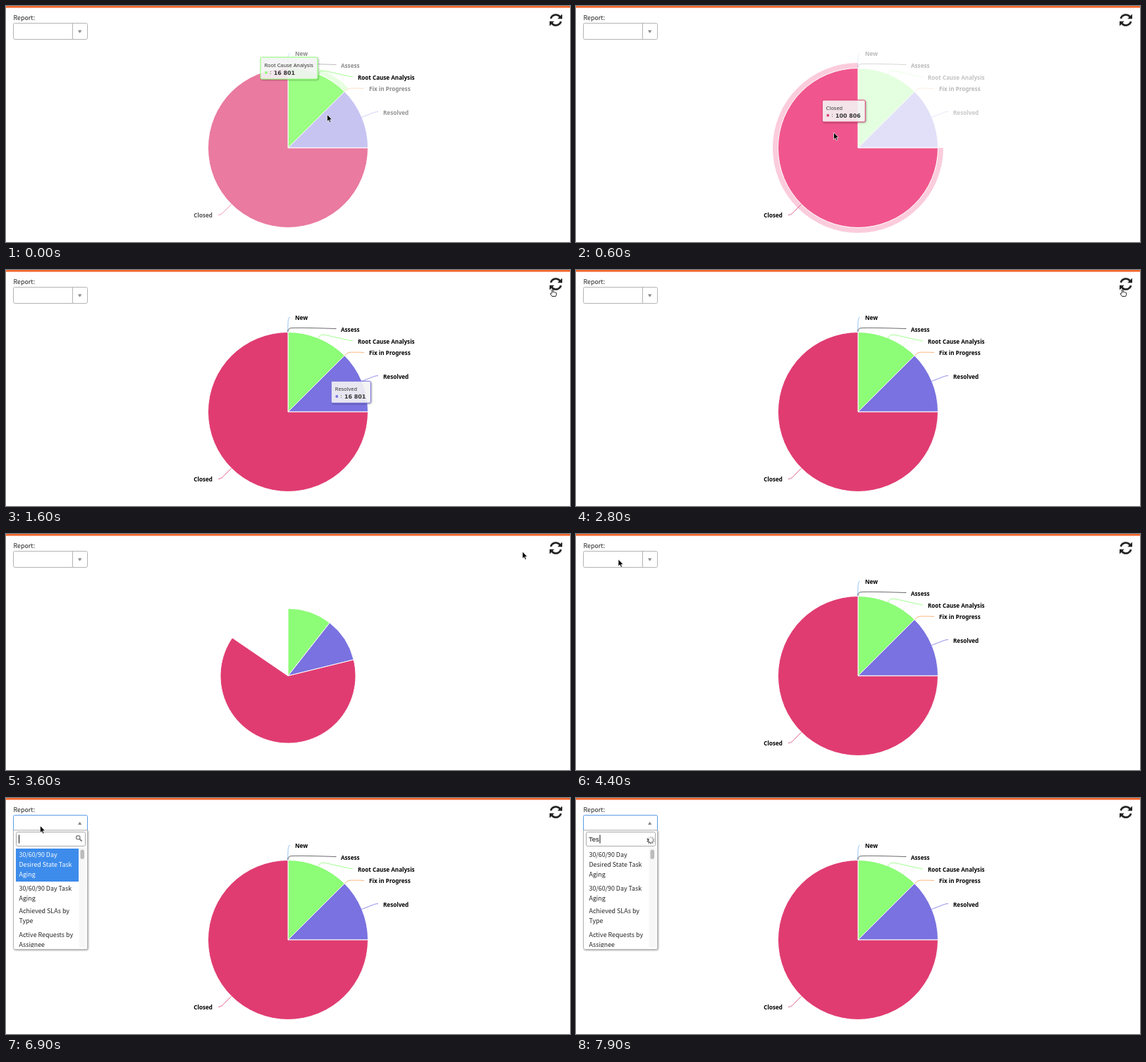
Write an HTML page that moves like this. It is 800 by 336 pixels and loops after 8000 ms.

```html
<!DOCTYPE html>
<html lang="en">
<head>
<meta charset="utf-8">
<title>Report pie chart</title>
<style>
html, body { margin: 0; width: 100%; height: 100%; overflow: hidden; background: #fff; }
svg { display: block; }
text { white-space: pre; }
.ui { font: 8.85px "Noto Sans CJK JP", "Noto Sans CJK SC", "Noto Sans CJK", sans-serif; fill: #222; }
.label { font: bold 8.1px "Noto Sans", sans-serif; }
.head { font: 7.4px "Noto Sans", sans-serif; fill: #333; }
.value { font: bold 7.9px "DejaVu Sans", sans-serif; fill: #333; }
.typed { font: 9.5px "Liberation Sans", sans-serif; fill: #111; }
</style>
</head>
<body>
<svg width="800" height="336" viewBox="0 0 800 336">
  <defs>
    <filter id="shadow" x="-20%" y="-20%" width="150%" height="150%">
      <feDropShadow dx="1" dy="1" stdDeviation="1" flood-opacity=".35"/>
    </filter>
    <clipPath id="listClip"><rect x="11" y="70" width="104" height="142.5"/></clipPath>
    <path id="arrowHalf" d="M772.8 17.8A7.5 7.5 0 0 1 786 15.6" fill="none" stroke="#222" stroke-width="2.7"/>
    <path id="arrowTip" d="M789 11.5V18.3H782.3Z" fill="#222"/>
  </defs>
  <rect width="800" height="2.6" fill="#f4662b"/>
  <text class="ui" x="10.5" y="20">Report:</text>

  <g id="refresh">
    <use href="#arrowHalf"/><use href="#arrowTip"/>
    <g transform="rotate(180 780 20)"><use href="#arrowHalf"/><use href="#arrowTip"/></g>
  </g>

  <g id="chart"></g>

  <g id="tip">
    <rect id="tipBox" height="31" rx="2" fill="#f8f8f8" fill-opacity=".86" filter="url(#shadow)"/>
    <text id="tipHead" class="head" x="5.5" y="14"></text>
    <circle id="tipDot" cx="8" cy="21.7" r="1.9"/>
    <text class="head" x="13.3" y="24.2">:</text>
    <text id="tipValue" class="value" x="18.8" y="24.5"></text>
  </g>

  <g id="closedBox" fill="none" stroke="#b4b4b4">
    <rect id="field" x="10.5" y="24.5" width="105" height="23" rx="2"/>
    <path d="M94.5 25V47"/>
    <path d="M102 34.5H107.4L104.7 38.8Z" fill="#888" stroke="none"/>
  </g>

  <g id="openBox">
    <path d="M10.5 46V26.5Q10.5 24.5 12.5 24.5H113.5Q115.5 24.5 115.5 26.5V46" fill="#fff" stroke="#5c9de6"/>
    <path d="M102 38H107.4L104.7 33.8Z" fill="#888"/>
    <path d="M10.5 46V213.5Q10.5 215.5 12.5 215.5H113.5Q115.5 215.5 115.5 213.5V46Z" fill="#fff" stroke="#b4b4b4" filter="url(#shadow)"/>
    <path d="M11 45.5H115" stroke="#ccc"/>
    <rect x="14.5" y="48.5" width="98" height="20" rx="2" fill="#fff" stroke="#aaa"/>
    <g id="lens" fill="none" stroke="#777">
      <circle cx="102.3" cy="56.3" r="2.7" stroke-width="1.2"/>
      <path d="M104.4 58.4L107.6 61.6" stroke-width="1.8"/>
    </g>
    <g id="spinner"></g>
    <text id="typed" class="typed" x="18" y="62"></text>
    <path id="caret" stroke="#111"/>
    <rect id="pick" x="14" y="72" width="89" height="47" fill="#3d8ceb"/>
    <g id="list" clip-path="url(#listClip)"></g>
    <rect x="103.5" y="71" width="10" height="142" fill="#f7f7f7"/>
    <rect x="105.5" y="73.5" width="5.5" height="13.5" rx="2.7" fill="#bcbcbc"/>
  </g>

  <path id="arrow" d="M0 0V10L2.3 7.9L3.9 11.5L5.5 10.8L4 7.3H7Z" fill="#000" stroke="#fff" stroke-width=".7"/>
  <path id="hand" d="M-.9 5.5V.5Q0-.8.9.5V4Q1.8 3.2 2.5 4.2Q3.4 3.5 4 4.6Q5.4 4.2 5.4 5.6V7.6L4.4 10H-.8L-3.2 6.4Q-3 5-1.8 5.8Z"
    fill="#fff" stroke="#111" stroke-width=".9"/>
</svg>
<script>
const $ = id => document.getElementById(id);
const CX = 400, CY = 202, R = 113.5, LOOP = 8000, RELOAD = 2857, TYPING = 7400;

function add(parent, tag, attrs, text = '') {
  const el = document.createElementNS('http://www.w3.org/2000/svg', tag);
  set(el, attrs);
  el.textContent = text;
  parent.append(el);
  return el;
}
function set(el, attrs) {
  for (const k in attrs) el.setAttribute(k, attrs[k]);
}
const show = (el, on) => set(el, { display: on ? 'inline' : 'none' });

// Linear interpolation through [time, value] pairs
function at(keys, t) {
  let i = keys.findIndex(k => k[0] > t);
  if (i < 0) return keys[keys.length - 1][1];
  if (!i) return keys[0][1];
  const [t0, a] = keys[i - 1], [t1, b] = keys[i];
  return a + (b - a) * (t - t0) / (t1 - t0);
}
const along = (path, t) => [1, 2].map(n => at(path.map(k => [k[0], k[n]]), t));

function sector(r, from, to) {
  const p = a => `${CX + r * Math.sin(a * Math.PI / 180)} ${CY - r * Math.cos(a * Math.PI / 180)}`;
  return `M${CX} ${CY}L${p(from)}A${r} ${r} 0 ${to - from > 180 ? 1 : 0} 1 ${p(to)}Z`;
}

const slices = [
  { name: 'Root Cause Analysis', value: '16 801', width: 81, from: 0, to: 45, base: '#8dfc77', hot: '#9aff82',
    fade: [[0, 1], [300, 1], [500, .24], [1100, .22], [1300, .47], [1500, 1]],
    heat: [[0, 1], [300, 1], [500, 0]], halo: [[0, .8], [300, .8], [450, 0]] },
  { name: 'Resolved', value: '16 801', width: 56, from: 45, to: 90, base: '#7972e0', hot: '#8781f1',
    fade: [[0, .42], [200, .22], [800, .22], [1000, 1]],
    heat: [[800, 0], [1000, 1], [1300, 1], [1500, 0]], halo: [[850, 0], [950, 1], [1100, 1], [1200, 0]] },
  { name: 'Closed', value: '100 806', width: 61, from: 90, to: 360, base: '#e03c72', hot: '#f0568d',
    fade: [[0, .68], [200, .35], [300, .35], [500, 1], [800, 1], [1000, .22], [1100, .22], [1300, .47], [1500, 1]],
    heat: [[300, 0], [500, 1], [800, 1], [1000, 0]], halo: [[300, 0], [500, 1], [800, 1], [900, 0]] }
];
const otherFade = [[0, .45], [200, .27], [1100, .27], [1300, .52], [1500, 1]];

const labels = [
  ['New', 410, 71.3, '#7cb5ec', 'M403 67.5C400.5 67.5 400.5 69 400 76L399.7 88'],
  ['Assess', 475, 88, '#434348', 'M468.5 83.6C440 82.5 412 82 404 82.7Q400 83 399.8 88'],
  ['Root Cause Analysis', 499, 104.6, '#8dfc77', 'M492 101C480 99 462 94 450 92.2Q445 91.3 443.3 97'],
  ['Fix in Progress', 515, 121.4, '#f7a35c', 'M508 117.5C500 117 492 117 487 117.3Q483.5 117.8 480.5 121.8'],
  ['Resolved', 535, 154.8, '#7972e0', 'M528 150.5C524 150.5 522 151.5 517 153.5L505 158.2'],
  ['Closed', 266.3, 301.4, '#e03c72', 'M301 297.5C305 297.5 307 295 311 291L319.5 282.5']
];

const chart = $('chart');
for (const s of slices) s.ring = add(chart, 'path', { d: sector(121, s.from, s.to), fill: s.hot });
for (const s of slices) {
  s.back = add(chart, 'path', { fill: '#fff' });
  s.el = add(chart, 'path', { stroke: '#fff', 'stroke-width': 1, 'stroke-linejoin': 'round' });
}
const labelEls = labels.map(([name, x, y, stroke, d]) => {
  const g = add(chart, 'g', {});
  add(g, 'path', { d, stroke, fill: 'none', 'stroke-width': .8 });
  add(g, 'text', { x, y, class: 'label' }, name);
  return { g, fade: (slices.find(s => s.name === name) || { fade: otherFade }).fade };
});

const rows = [
  ['30/60/90 Day', 83.7], ['Desired State Task', 98], ['Aging', 112.2],
  ['30/60/90 Day Task', 131.7], ['Aging', 145.8], ['Achieved SLAs by', 164.2],
  ['Type', 178.3], ['Active Requests by', 197.7], ['Assignee', 212]
].map(([name, y]) => add($('list'), 'text', { x: 18.5, y, class: 'ui' }, name));

const spokes = Array.from({ length: 10 }, (_, i) =>
  add($('spinner'), 'path', { d: 'M106 57.3V54.5', stroke: '#222', 'stroke-width': 1.5, transform: `rotate(${i * 36} 106 60)` }));

const pointer = [
  [0, 455.5, 154.5], [300, 415, 169], [600, 365.5, 180], [700, 367, 182], [900, 440, 188], [1100, 515, 180],
  [1300, 768, 55.5], [1600, 775.3, 27.5], [3200, 775.3, 27.5], [3600, 732.5, 25], [4000, 400, 22],
  [4400, 60, 36], [4700, 48.5, 39.5]
];
const tipPath = [
  [0, 361, 73], [200, 402, 103], [350, 385, 115], [600, 349.3, 134], [700, 341, 137], [800, 350, 141],
  [900, 400, 150], [1100, 461.3, 158.3]
];

function drawChart(t) {
  const x = Math.min(1, (t - RELOAD) / 1000);
  const grow = t < RELOAD ? 1 : .5 - .5 * Math.cos(Math.PI * x);
  for (const s of slices) {
    const d = sector(R * grow, s.from * grow, s.to * grow);
    set(s.back, { d });
    set(s.el, {
      d, 'fill-opacity': at(s.fade, t),
      fill: `color-mix(in srgb, ${s.hot} ${at(s.heat, t) * 100}%, ${s.base})`
    });
    set(s.ring, { opacity: .3 * at(s.halo, t) });
  }
  const appear = t < RELOAD ? 1 : at([[3860, 0], [4100, 1]], t);
  for (const l of labelEls) set(l.g, { opacity: appear * at(l.fade, t) });
}

function drawTip(t) {
  const s = slices[t < 400 ? 0 : t < 850 ? 2 : 1];
  const [x, y] = along(tipPath, t);
  set($('tip'), { transform: `translate(${x} ${y})`, opacity: at([[1700, 1], [1900, 0]], t) });
  set($('tipBox'), { width: s.width, stroke: s.base });
  set($('tipDot'), { fill: s.base });
  $('tipHead').textContent = s.name;
  $('tipValue').textContent = s.value;
}

function drawSelect(t) {
  const open = t >= 4700, typing = t >= TYPING;
  show($('closedBox'), !open);
  show($('openBox'), open);
  set($('field'), { stroke: t >= 4500 ? '#5c9de6' : '#b4b4b4' });
  const count = typing ? Math.min(3, 1 + Math.floor((t - TYPING) / 200)) : 0;
  $('typed').textContent = 'Tes'.slice(0, count);
  const cx = [18.5, 24.3, 29.3, 34][count];
  set($('caret'), { d: `M${cx} 52.5V64.5` });
  show($('caret'), typing || (t - 4700) % 1000 < 500 || t >= 5600 && t < 5800);
  show($('lens'), !typing);
  show($('spinner'), typing);
  spokes.forEach((el, i) => set(el, { opacity: .15 + .85 * ((i + 10 - Math.floor(t / 100) % 10) % 10) / 9 }));
  show($('pick'), !typing);
  rows.forEach((el, i) => { el.style.fill = i < 3 && !typing ? '#fff' : '#222'; });
}

function drawPointer(t) {
  const [x, y] = along(pointer, t);
  const hand = t >= 1500 && t < 3300;
  for (const id of ['arrow', 'hand']) set($(id), { transform: `translate(${x} ${y})` });
  show($('hand'), hand);
  show($('arrow'), !hand && t < TYPING);
}

const start = performance.now();
function frame(now) {
  const t = Math.floor(Math.max(0, now - start) % LOOP / 100) * 100;
  drawChart(t);
  drawTip(t);
  drawSelect(t);
  drawPointer(t);
  requestAnimationFrame(frame);
}
frame(start);
</script>
</body>
</html>
```
